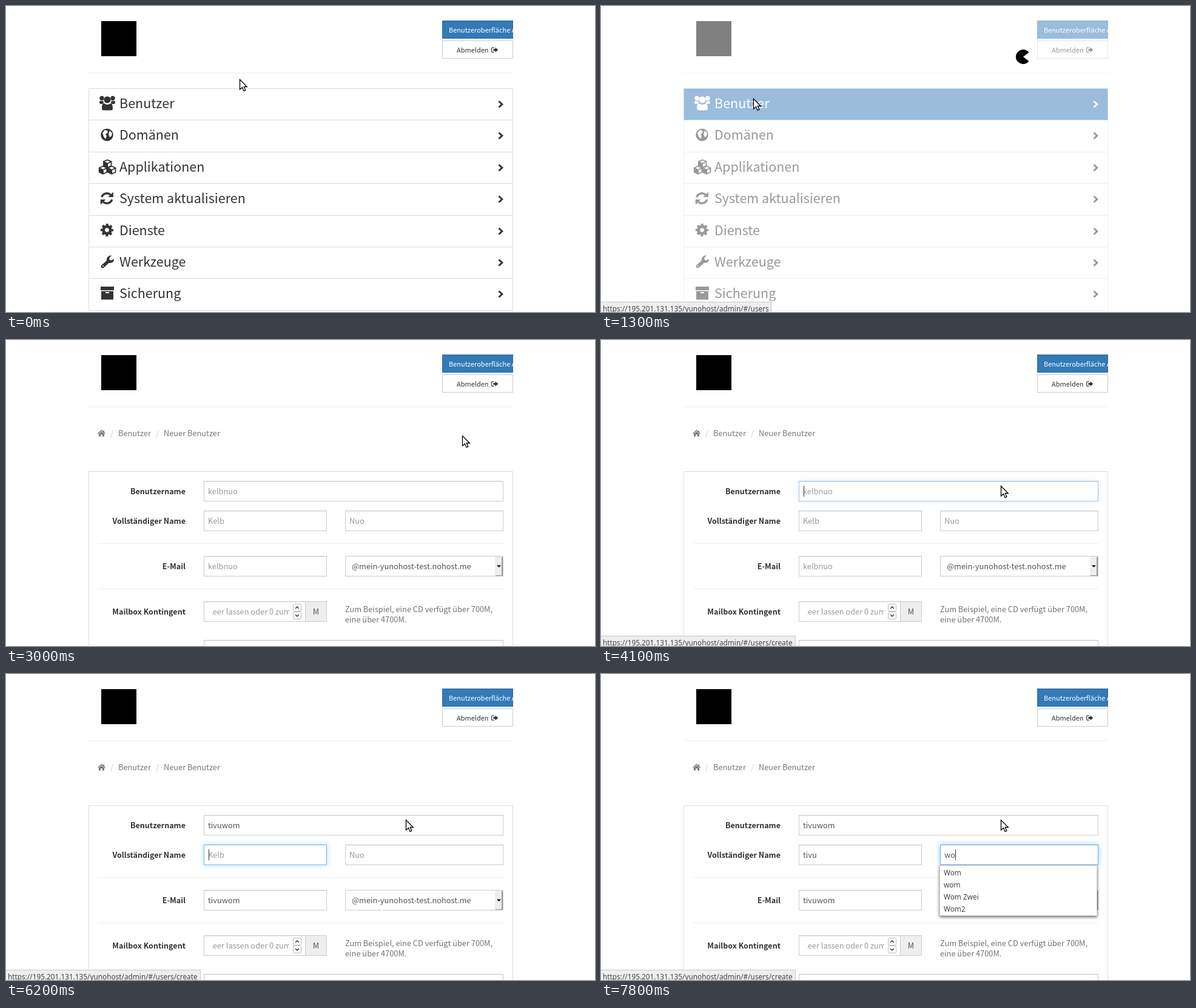
These frames come from a looping animation (971x506 px, 8 s). An HTML page:

```html
<!DOCTYPE html>
<html lang="de">
<head>
<meta charset="utf-8">
<title>Benutzer anlegen</title>
<style>
  html, body { margin: 0; width: 100%; height: 100%; overflow: hidden; background: #fff; }
  #stage { display: block; width: 971px; height: 506px; }
  text { font: 12.8px "Noto Sans CJK JP", "Noto Sans CJK SC", "Noto Sans CJK KR", "Open Sans", sans-serif; white-space: pre; }
  .big { font-size: 21.5px; }
  .small { font-size: 11px; }
  .foot { font-size: 11.45px; }
  .bold { font-size: 12.55px; font-weight: 700; }
  .ui { font: 11.8px "Noto Sans", sans-serif; }
  .glow { filter: drop-shadow(0 0 4px rgba(102, 175, 233, .7)); }
  .menu { filter: drop-shadow(0 2px 2.5px rgba(0, 0, 0, .6)); }
</style>
</head>
<body>
<svg id="stage" viewBox="0 0 971 506"></svg>
<script>
const LOOP = 8000, STEP = 100;
const stage = document.getElementById('stage');
const pen = document.createElement('canvas').getContext('2d');
pen.font = '12.8px "Noto Sans CJK JP", "Noto Sans CJK SC", "Noto Sans CJK KR", "Open Sans", sans-serif';

const userName = 'tivuwom';
const userHints = ['tivuwom', 'Tivuwom', 'tivuwom@tolvex.de', 'tivuwom2'];
const firstHints = ['Tiv', 'Tivu', 'tivu'];
const lastHints = ['Wom', 'wom', 'Wom Zwei', 'Wom2'];

const clamp = v => Math.min(1, Math.max(0, v));
const ease = (t, a, b) => { const k = clamp((t - a) / (b - a)); return k * k * (3 - 2 * k); };
const mix = (a, b, k) => a + (b - a) * k;

const text = (x, y, str, fill = '#333', cls = '', anchor = 'start') =>
  `<text x="${x}" y="${y}" fill="${fill}" class="${cls}" text-anchor="${anchor}">${str}</text>`;
const fillRect = (x, y, w, h, fill, more = '') =>
  `<rect x="${x}" y="${y}" width="${w}" height="${h}" fill="${fill}" ${more}/>`;
const box = (x, y, w, h, fill, stroke, more = '') =>
  fillRect(x + .5, y + .5, w - 1, h - 1, fill, `stroke="${stroke}" ${more}`);
const line = (x, y, w) => fillRect(x, y, w, 1, '#eee');
const at = (x, y, color, shapes) => `<g transform="translate(${x} ${y})" fill="${color}" color="${color}">${shapes}</g>`;
const stroke = (d, width = 2, color = 'currentColor') =>
  `<path d="${d}" fill="none" stroke="${color}" stroke-width="${width}"/>`;
const clip = (x, y, w, h, inner) =>
  `<svg x="${x}" y="${y}" width="${w}" height="${h}" viewBox="${x} ${y} ${w} ${h}">${inner}</svg>`;

const sideUser = '<circle cx="-9" cy="-8.5" r="3.7"/><path d="M-7-4C-10-3-13-6-13-1Q-13 1-10.5 1H-8Q-4.5-1-7-4Z"/>';
const cube = (x, y) => `<g transform="translate(${x} ${y})"><path d="M-6-3L0 0V7L-6 4Z"/>${stroke('M0-6L6.3-3.3V3.7L0 6.7L-6.3 3.7V-3.3ZM-6-3L0 0L6-3M0 0V6', 1.8)}</g>`;
const halfTurn = stroke('M-8.5-2A9 9 0 0 1 6-6', 3.4) + '<path d="M10.5-10.5V-2H2Z"/>';

const rows = [
  ['Benutzer', `<circle cy="-6" r="5.6"/><path d="M-5.5 0C-8.5 0-9 5-9 8Q-9 11.5-6 11.5H6Q9 11.5 9 8C9 5 8.5 0 5.5 0Q0 4-5.5 0Z"/>${sideUser}<g transform="scale(-1 1)">${sideUser}</g>`],
  ['Domänen', '<circle cx="-.5" r="10.3"/><path fill="#fff" d="M-8-3L-4-8L0-7L1-4L-3-1L-1 2L-3 7L-6 3ZM4-7L8-3L7 2L4 4L2-1Z"/>'],
  ['Applikationen', cube(.2, -5.5) + cube(-7, 5) + cube(7.2, 5)],
  ['System aktualisieren', `<g transform="translate(-.7 0)">${halfTurn}<g transform="rotate(180)">${halfTurn}</g></g>`],
  ['Dienste', '<g transform="translate(-.5 -.5)" fill="none" stroke="currentColor"><circle r="5.8" stroke-width="4.8"/><circle r="9" stroke-width="3.2" stroke-dasharray="3.9 3.169" stroke-dashoffset="1.95"/></g>'],
  ['Werkzeuge', stroke('M-7.5 7.5L4-3', 5.4) + '<circle cx="-7.5" cy="7.5" r="2.8"/><path d="M7.5-10.5L3.5-7V-3L7-2.5L11-5Q11 2 4.5 2Q-2 1-1-5Q1-11 7.5-10.5Z"/><circle cx="-7" cy="7" r="1" fill="#fff"/>'],
  ['Sicherung', '<path d="M-11-11H11V-5H-11ZM-10-3.5H10V10.5H-10Z"/><path fill="#fff" d="M-3-2H3V0H-3Z"/>'],
];

function header() {
  return fillRect(157, 25, 58, 58, '#000')
    + box(719, 24, 117, 30, '#337ab7', '#2e6da4')
    + clip(719, 24, 117, 30, text(730, 44, 'Benutzeroberfläche A', '#fff', 'small'))
    + box(719, 57, 117, 30, '#fff', '#ccc') + text(743, 77, 'Abmelden', '#333', 'small')
    + at(800, 68, '#333', stroke('M4.5.8H2Q.7.8.7 2V7Q.7 8.3 2 8.3H4.5', 1.2) + '<path d="M3.5 3H6.5V.5L11.3 4.6L6.5 8.7V6.2H3.5Z"/>')
    + line(136, 110, 700);
}

function home(t) {
  const hover = t >= 600, clicked = t >= 800;
  const list = rows.map(([label, icon], i) => {
    const top = Math.round(136 + 52.4 * i), active = hover && !i;
    const color = active ? '#fff' : '#333';
    const height = Math.round(136 + 52.4 * (i + 1)) - top + 1;
    return box(136, top, 700, height, active ? '#337ab7' : '#fff', active ? '#337ab7' : '#ddd')
      + (active && clicked ? box(136, top, 700, height, 'none', '#fff', 'stroke-dasharray="1 1"') : '')
      + at(167, top + 25, color, icon) + text(187, top + 33, label, color, 'big')
      + at(816, top + 26.5, color, stroke('M-3.5-5L1.8 0L-3.5 5', 3));
  });
  return list.reverse().join('');
}

function breadcrumb(...names) {
  const homeIcon = '<path d="M0 6L6.5 0L9.5 2.7V1H11V4L13 6L12 7L6.5 2L1 7ZM2 7L6.5 3L11 7V11H8V7.5H5V11H2Z"/>';
  return at(151, 148.5, '#777', homeIcon)
    + names.map((name, i) => text(172 + 75 * i, 159, '/', '#ccc') + text(185 + 75 * i, 159, name, '#777')).join('');
}

function users() {
  return breadcrumb('Benutzer')
    + box(703, 136, 133, 34, '#5cb85c', '#4cae4c')
    + at(721.5, 153.5, '#fff', stroke('M-5.5 0H5.5M0-5.5V5.5', 3.2)) + text(730, 158, 'Neuer Benutzer', '#fff')
    + box(136, 217, 700, 52, '#fcf8e3', '#f5e8c8')
    + at(159, 236, '#8a5f3b', '<path d="M0 0L6.7 12.5H-6.7Z" stroke="currentColor" stroke-linejoin="round"/>' + stroke('M0 4V8.5M0 9.5V11.5', 2, '#fcf8e3'))
    + text(169, 248, 'Keine Benutzer.', '#8a5f3b')
    + line(136, 314, 700)
    + text(836, 349, 'Angetrieben von <tspan fill="#444">YunoHost</tspan> 3.3.3.', '#999', 'foot', 'end');
}

function input(x, y, w, value, hint, focus = 0) {
  const glow = focus ? box(x, y, w, 34, '#fff', '#66afe9', `class="glow" opacity="${focus}"`) : '';
  const caret = focus ? fillRect(Math.round(x + 7.5 + pen.measureText(value).width), y + 8, 1, 18, '#333') : '';
  return box(x, y, w, 34, '#fff', '#ccc') + glow + fillRect(x + 1, y + 1, w - 2, 1, '#000', 'opacity=".07"')
    + text(x + 7, y + 22, value || hint, value ? '#555' : '#999') + caret;
}

function menu(x, y, w, hints, typed) {
  const found = hints.filter(h => h.toLowerCase().startsWith(typed));
  return box(x, y, w, 20 * found.length + 4, '#fff', '#ccc', 'class="menu"')
    + found.map((h, i) => text(x + 7, y + 17 + 20 * i, h, '#444', 'ui')).join('');
}

function form(t) {
  // First letter, then one more per step.
  const type = (word, first, next) => t < first ? '' : word.slice(0, 1 + Math.max(0, (t - next) / STEP + 1));
  const user = type(userName, 5100, 5300);
  const first = type('tivu', 6800, 7000);
  const last = type('wo', 7700, 7800);
  const userFocus = t < 6200 ? clamp((t - 4000) / 300) : 0;
  const firstFocus = t < 6200 || t >= 7400 ? 0 : t < 6500 ? .7 : 1;
  const lastFocus = clamp((t - 7300) / 300);
  const label = (y, str) => text(296, y, str, '#333', 'bold', 'end');
  const spin = (y, d) => box(473, y, 14, 13, '#fdfdfd', '#bbb', 'rx="2"') + at(480, y + 6.5, '#333', stroke(d, 1.4));

  return breadcrumb('Benutzer', 'Neuer Benutzer')
    + box(136, 217, 700, 320, '#fff', '#ddd')
    + label(255, 'Benutzername') + input(326, 233, 494, user, 'kelbnuo', userFocus)
    + label(304, 'Vollständiger Name')
    + input(326, 282, 203, first, 'Kelb', firstFocus) + input(559, 282, 261, last, 'Nuo', lastFocus)
    + line(152, 336, 668)
    + label(379, 'E-Mail') + input(326, 357, 203, t >= 6200 ? userName : '', 'kelbnuo')
    + box(559, 357, 261, 34, '#fff', '#ccc') + text(570, 379, '@mein-yunohost-test.nohost.me', '#555')
    + fillRect(806, 358, 13, 32, '#eee') + fillRect(817, 359, 2, 31, '#999') + fillRect(807, 389, 12, 1, '#999')
    + '<path d="M809 372.5H816L812.5 376Z"/>'
    + line(152, 411, 668)
    + label(454, 'Mailbox Kontingent') + input(326, 432, 168, '', '')
    + clip(340, 433, 127, 32, text(334, 454, 'Leer lassen oder 0 zum Abschalten', '#999'))
    + spin(436, 'M-2.8 1.4L0-1.4L2.8 1.4') + spin(449, 'M-2.8-1.4L0 1.4L2.8-1.4')
    + box(493, 432, 36, 34, '#eee', '#ccc') + text(511, 454, 'M', '#555', '', 'middle')
    + text(559, 450, 'Zum Beispiel, eine CD verfügt über 700M,', '#737373')
    + text(559, 467, 'eine über 4700M.', '#737373')
    + input(326, 496, 494, '', '')
    + (t >= 5100 && t < 6200 ? menu(326, 267, 493, userHints, user) : '')
    + (t >= 6900 && t < 7400 ? menu(326, 316, 202, firstHints, first) : '')
    + (t >= 7700 ? menu(558, 316, 260, lastHints, last) : '');
}

function loader(t) {
  if (t < 800 || t >= 1500) return '';
  const fade = fillRect(0, 0, 971, 506, '#fff', `opacity="${.5 * clamp((t - 800) / 200)}"`);
  const mouth = t % 200 ? .65 : .24;
  const x = 12 * Math.cos(mouth), y = 12 * Math.sin(mouth);
  return fade + at(296 + (t - 1000) * 1.333, 84, '#000', `<path d="M0 0L${x} ${-y}A12 12 0 1 0 ${x} ${y}Z"/>`);
}

function status(t) {
  const create = t >= 3000;
  const alpha = create ? clamp((t - 3100) / 200) : t < 600 || t >= 1800 ? 0 : t < 1700 ? 1 : .65;
  if (!alpha) return '';
  return `<g opacity="${alpha}">` + box(-1, 489, create ? 322 : 282, 20, '#eee', '#c8c8c8')
    + text(3, 505, 'https://195.201.131.135/yunohost/admin/#/users' + (create ? '/create' : ''), '#444', 'ui') + '</g>';
}

function cursor(t) {
  const go = ease(t, 200, 800), back = ease(t, 1700, 2400);
  const [x, y] = t >= 3800 ? [659, 241]
    : t >= 1700 ? [mix(251, 752, back), mix(153, 158, back)]
    : [mix(385, 251, go), mix(121, 153, go)];
  return at(x + .5, y + .5, '#fff', '<path d="M0 0V16.5L4 13L6.5 19L9.3 17.8L6.8 12H11.8Z" stroke="#000" stroke-width="1.3"/>');
}

let shown = -1;
function frame() {
  const t = Math.floor(performance.now() % LOOP / STEP) * STEP;
  if (t !== shown) {
    shown = t;
    const page = t < 1500 ? home(t) : t < 3000 ? users() : form(t);
    stage.innerHTML = header() + page + loader(t) + status(t) + cursor(t);
  }
  requestAnimationFrame(frame);
}
frame();
</script>
</body>
</html>
```
